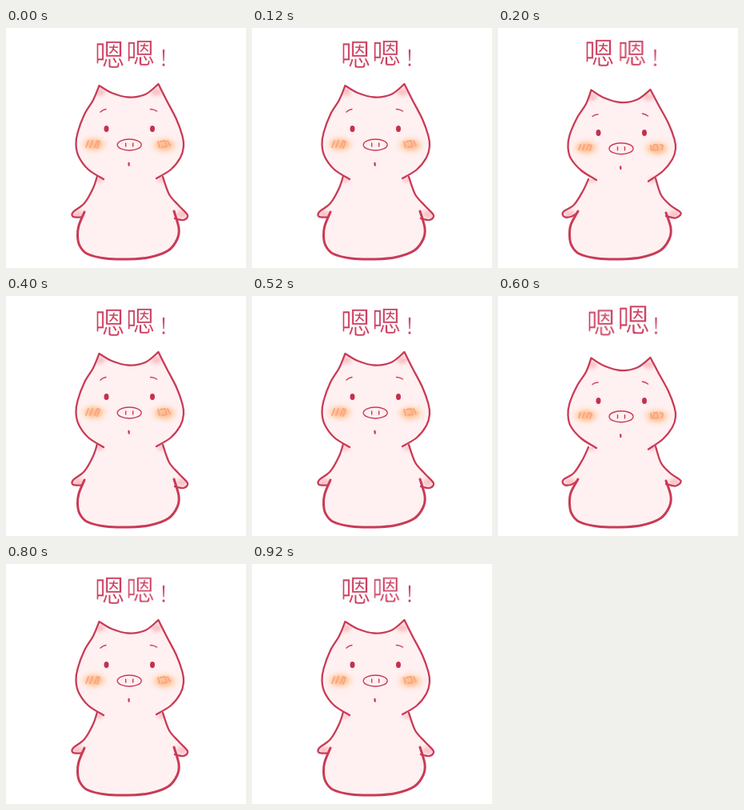
Recreate the animation shown at these times as an HTML page. Size 300x300 px, loop 1000 ms.

```html
<!DOCTYPE html>
<html lang="zh">
<head>
<meta charset="utf-8">
<title>嗯嗯!</title>
<style>
  html, body { margin: 0; width: 100%; height: 100%; overflow: hidden; background: #fff; }
  svg { display: block; width: 100vw; height: 100vh; }
  .skin { fill: #fff0f1; }
  .ink, .bold, .thin, .mark { fill: none; stroke: #c93b56; stroke-width: 2.3; stroke-linecap: round; stroke-linejoin: round; }
  .bold { stroke-width: 3; }
  .thin { stroke-width: 1.4; }
  .mark { stroke: #f9a67e; stroke-width: 1.9; }
  .dot { fill: #c5304f; }
  .glow { fill: #ffd3ae; filter: url(#soft); }
  .core { fill: #ffbc94; filter: url(#blush); }
  .rosy { fill: #f9b3b9; opacity: .75; filter: url(#blush); }
  text { fill: #cd4061; stroke: #fff; stroke-width: .5; text-anchor: middle; font-family: "Noto Sans CJK SC", "Noto Sans CJK", sans-serif; font-weight: 300; }
</style>
</head>
<body>
<svg viewBox="0 0 300 300">
  <defs>
    <filter id="soft" x="-50%" y="-50%" width="200%" height="200%"><feGaussianBlur stdDeviation="3"/></filter>
    <filter id="blush" x="-60%" y="-60%" width="220%" height="220%"><feGaussianBlur stdDeviation="2.2"/></filter>
  </defs>
  <g id="pigs"></g>
  <g class="word"><text y="14" font-size="38">嗯</text></g>
  <g class="word"><text y="14" font-size="38">嗯</text></g>
  <g class="word"><text y="10" font-size="28">!</text></g>
</svg>
<script>
const LOOP = 1000;

// Outlines are points along smooth curves; each new curve starts at a corner.
const poses = [
  {
    head: [
      [122, 189, 103, 177, 91, 161, 87.5, 146, 89.5, 131, 98, 108, 109, 90, 116.5, 72],
      [116.5, 72, 132, 81, 153, 86.5, 174, 83, 190.5, 70],
      [190.5, 70, 200, 89, 213, 114, 220.5, 135, 222, 148, 218, 162, 206, 177, 188, 188]
    ],
    left: [114, 185, 109, 200, 98, 219, 84, 230, 84, 236, 95, 236.5],
    torso: [98, 230, 91, 247, 89.5, 260, 92, 272, 101, 282, 124, 288, 153, 289, 180, 286.5, 203, 278, 214, 264, 216, 250, 210, 229],
    right: [211, 238, 222, 240, 227, 234, 216, 222, 204, 208, 196, 186],
    top: 72,
    brows: ['M118 105Q121 102 125 101.5', 'M180.5 101.5Q185 101.5 188.5 104'],
    eyes: [[125.5, 126], [183, 126]],
    cheeks: [[110, 145.5], [198, 146.5]],
    marks: ['M100 149L103 141M105 149L108 141M111 149L114 141L117 142L114 150',
            'M190 142L192 149M193 142L199 141L201 148L195 149M202 141L205 147'],
    nose: [154.2, 146],
    mouth: 'M153.5 169L153.7 171.5'
  },
  {
    head: [
      [123, 190, 104, 178, 91, 163, 87.5, 149, 89.5, 134, 99, 112, 110, 95, 116.5, 77.5],
      [116.5, 77.5, 132, 87, 153, 93, 174, 89.5, 190.5, 77],
      [190.5, 77, 200, 95, 213, 119, 220.5, 139, 222, 151, 218, 164, 206, 179, 188, 191.5]
    ],
    left: [113, 189, 106, 204, 95, 221, 81.5, 230, 83, 236, 91, 236, 98, 232],
    torso: [100, 229, 91, 246, 89.5, 260, 92, 272, 101, 282, 124, 288, 153, 289, 180, 286.5, 203, 278, 214, 264, 216, 250, 210, 231],
    right: [210, 235, 222, 237.5, 228.5, 231, 216, 222, 204, 209, 197, 188],
    top: 78,
    brows: ['M118 110.5Q121 108 125 108', 'M180.5 107Q184 107.5 187.5 110'],
    eyes: [[125.5, 131], [183, 131]],
    cheeks: [[110, 149.5], [198.5, 150.5]],
    marks: ['M101 152L103 146M106 152L108 146M111 152L113 146L117 147L115 153',
            'M191 147L192 153M194 152L195 146L199 146L200 152L195 153M203 146L206 147L205 152'],
    nose: [154, 150.7],
    mouth: 'M153.2 173.5L153.3 176'
  }
];

// Catmull-Rom spline through a flat list of points, as cubic segments.
function curve(flat, start = 'M') {
  const at = i => {
    const k = 2 * Math.max(0, Math.min(flat.length / 2 - 1, i));
    return [flat[k], flat[k + 1]];
  };
  let d = start + at(0).join(' ');
  for (let i = 0; i < flat.length / 2 - 1; i++) {
    const [a, b, c, e] = [at(i - 1), at(i), at(i + 1), at(i + 2)];
    const out = b.map((v, j) => v + (c[j] - a[j]) / 6);
    const into = c.map((v, j) => v - (e[j] - b[j]) / 6);
    d += 'C' + [...out, ...into, ...c].join(' ');
  }
  return d;
}

const join = lists => lists.map((pts, i) => curve(pts, i ? 'L' : 'M')).join('');
const path = (cls, d) => `<path class="${cls}" d="${d}"/>`;
const paths = (cls, list) => list.map(d => path(cls, d)).join('');
const oval = (cls, [x, y], rx, ry) => `<ellipse class="${cls}" cx="${x}" cy="${y}" rx="${rx}" ry="${ry}"/>`;
const ovals = (cls, list, rx, ry) => list.map(c => oval(cls, c, rx, ry)).join('');

function drawPig(p, i) {
  const head = join(p.head), body = join([p.left, p.torso, p.right]);
  const blush = [[117, p.top + 8], [188, p.top + 8], [90, 233], [220, 233]];
  return `<g class="pig">
    <clipPath id="clip${i}">${path('', head)}${path('', body)}</clipPath>
    ${path('skin', body)}${path('skin', head)}
    <g clip-path="url(#clip${i})">
      ${ovals('rosy', blush, 7, 5)}${ovals('rosy', [[117, 190], [194, 190]], 5, 3)}
      ${ovals('glow', p.cheeks, 14, 8)}${ovals('core', p.cheeks, 9, 5)}
    </g>
    ${paths('ink', [head, curve(p.left), curve(p.right)])}${path('bold', curve(p.torso))}
    ${paths('thin', p.brows)}${paths('mark', p.marks)}
    ${ovals('dot', p.eyes, 3, 3.9)}
    <g transform="translate(${p.nose})">
      ${oval('thin', [0, 0], 15, 7)}${path('thin', 'M-4.5 -2V2M4.5 -2V2')}
    </g>
    ${path('ink', p.mouth)}</g>`;
}

// Plays one value per equal step, with hard cuts.
function play(el, prop, values) {
  const n = values.length;
  const steps = [...values, values[n - 1]].map((v, i) => ({ [prop]: v, offset: i / n, easing: 'step-end' }));
  el.animate(steps, { duration: LOOP, iterations: Infinity });
}

const place = ([x, y, s = 1]) => `translate(${x}px, ${y}px) scale(${s})`;

document.getElementById('pigs').innerHTML = poses.map(drawPig).join('');

const order = [0, 1, 0, 1, 0];
document.querySelectorAll('.pig').forEach((pig, i) =>
  play(pig, 'opacity', order.map(k => k === i ? 1 : 0)));

const rest = [[129.5, 32.5], [168, 32, 0.95], [197, 38]];
const first = [[126.5, 30.5], [167.5, 32, 0.95], [196.5, 38]];
const second = [[129, 32.5, 0.97], [169.5, 29.5, 1.08], [197.5, 38]];
document.querySelectorAll('.word').forEach((word, i) =>
  play(word, 'transform', [rest, first, rest, second, rest].map(s => place(s[i]))));
</script>
</body>
</html>
```
